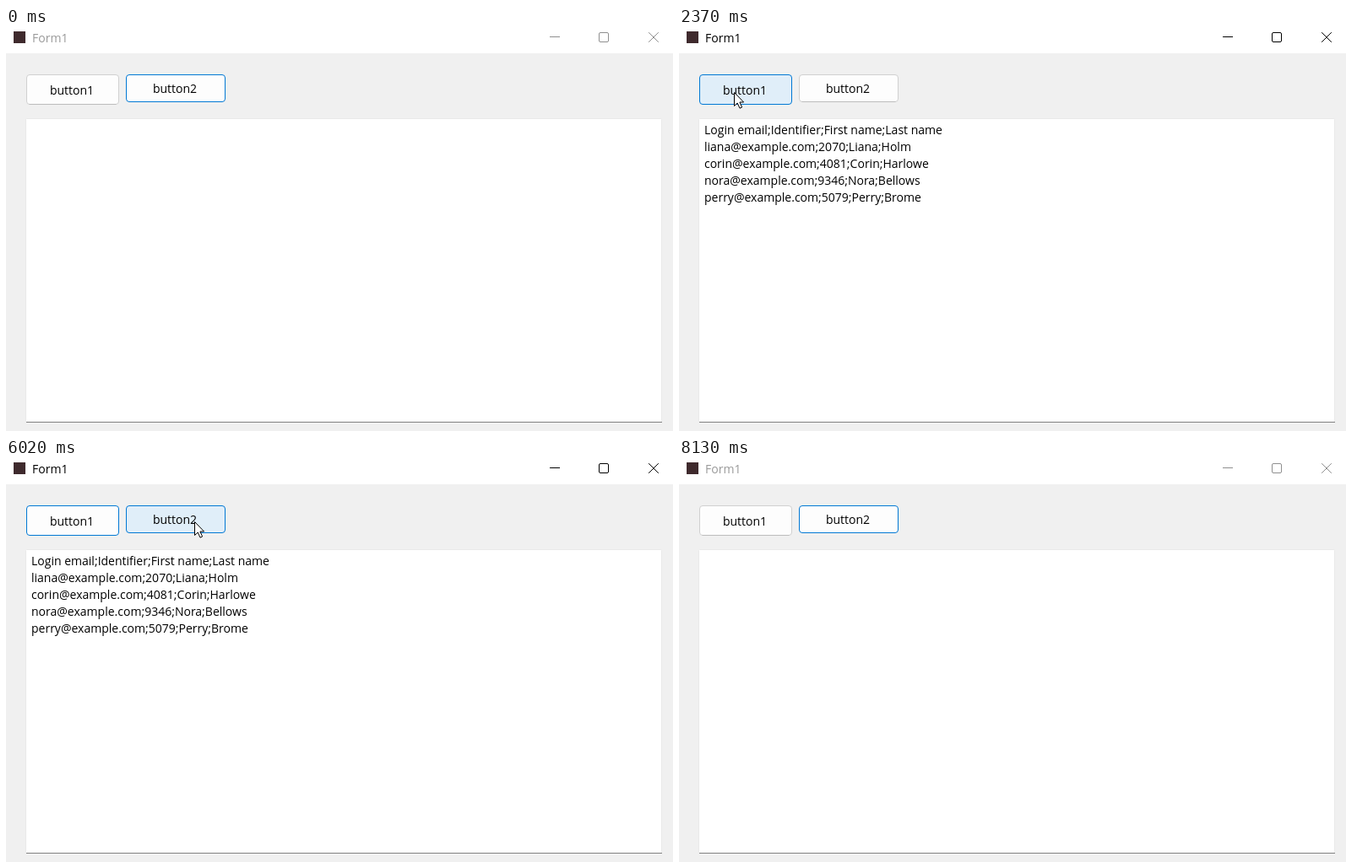
An HTML page for the animation above (8200 ms loop, 790 by 478 pixels).

```html
<!DOCTYPE html>
<html lang="en">
<head>
<meta charset="utf-8">
<title>Form1</title>
<style>
  html, body { margin: 0; width: 100%; height: 100%; overflow: hidden; background: #f0f0f0; }
  svg { display: block; width: 790px; height: 478px; }
  text { font: 14px "Open Sans", "Noto Sans", sans-serif; fill: #000; white-space: pre; }
  .btn text { text-anchor: middle; }
  .btn rect { fill: #fdfdfd; stroke: #d0d0d0; }
  .btn path { fill: none; stroke: #bcbcbc; }
  .btn.focus rect, .btn.hover rect { stroke: #0078d4; }
  .btn.focus path, .btn.hover path { stroke: none; }
  .btn.hover rect { fill: #e0eef9; }
  .btn.press rect { fill: #cce4f7; }
  .sys { fill: none; stroke: #000; }
  .idle .sys { stroke: #8f8f8f; }
  .idle text { fill: #999; }
</style>
</head>
<body>
<svg viewBox="0 0 790 478">
  <rect width="790" height="478" fill="#f0f0f0"/>
  <rect width="790" height="30" fill="#fff"/>
  <rect x="9" y="4" width="14" height="14" fill="#3f2a2d"/>
  <g id="bar">
    <text x="31" y="17">Form1</text>
    <path class="sys" d="M644 10.5H656"/>
    <rect class="sys" x="702.5" y="5.5" width="11" height="11" rx="1.5"/>
    <path class="sys" d="M761.2 5.2L772.8 16.8M772.8 5.2L761.2 16.8"/>
  </g>
  <g class="btn" id="one">
    <rect x="24.5" y="55.5" width="109" height="35" rx="3.5"/>
    <path d="M27.5 90.5H130.5"/>
    <text x="78" y="79">button1</text>
  </g>
  <g class="btn" id="two">
    <rect x="142.5" y="55.5" width="117" height="32" rx="3.5"/>
    <path d="M145.5 87.5H256.5"/>
    <text x="200" y="77">button2</text>
  </g>
  <rect x="23.5" y="107.5" width="753" height="360" rx="1" fill="#fff" stroke="#e9e9e9"/>
  <path d="M24 467.5H777" stroke="#808080"/>
  <g id="rows"></g>
  <path id="cursor" d="M.5 .5V16.5L4.2 13L7 19.2L9.6 18L6.9 12H11.6Z"
        fill="#fff" stroke="#000" stroke-linejoin="round"/>
</svg>
<script>
const LOOP = 8200;
const $ = id => document.getElementById(id);
const bar = $('bar'), rows = $('rows'), cursor = $('cursor');

const lines = [
  'Login email;Identifier;First name;Last name',
  'liana@example.com;2070;Liana;Holm',
  'corin@example.com;4081;Corin;Harlowe',
  'nora@example.com;9346;Nora;Bellows',
  'perry@example.com;5079;Perry;Brome'
];
lines.forEach((line, i) => {
  const el = document.createElementNS('http://www.w3.org/2000/svg', 'text');
  el.setAttribute('x', 30);
  el.setAttribute('y', 126 + 20 * i);
  el.textContent = line;
  rows.append(el);
});

const linear = p => p;
const easeOut = p => 1 - (1 - p) ** 1.6;
const easeIn = p => p * p;

const STEP = 67;
const SHOW = 130, HIDE = 7440;
const strokes = [
  { at: SHOW, end: 880, from: [546, 453], bend: [280, 450], to: [60, 89], ease: easeOut },
  { at: 960, end: 1100, from: [62, 86], bend: [64, 82], to: [65, 77], ease: linear },
  { at: 1380, end: 1380, from: [65, 76], bend: [65, 76], to: [65, 76], ease: linear },
  { at: 5290, end: 5690, from: [77, 77], bend: [118, 84], to: [174, 74], ease: linear },
  { at: 5770, end: 6020, from: [188, 74], bend: [212, 74], to: [223, 74], ease: linear },
  { at: 7040, end: 7370, from: [240, 77], bend: [460, 100], to: [704, 197], ease: easeIn }
];

const buttons = [
  { el: $('one'), x: 24, r: 134, b: 91, press: [2300, 2370], focus: t => within(t, 2300, 6440) },
  { el: $('two'), x: 142, r: 260, b: 88, press: [6440, 6500], focus: t => !within(t, 2300, 6440) }
];

function within(t, from, to) { return t >= from && t < to; }

function pointer(t) {
  if (!within(t, SHOW, HIDE)) return null;
  const { at, end, from, bend, to, ease } = strokes.findLast(s => s.at <= t);
  const steps = Math.round((end - at) / STEP);
  const p = t >= end ? 1 : Math.floor((t - at) / (end - at) * steps) / steps;
  const u = ease(p), v = 1 - u;
  return from.map((a, i) => Math.round(v * v * a + 2 * u * v * bend[i] + u * u * to[i]));
}

function draw(t) {
  const pos = pointer(t);
  cursor.style.display = pos ? '' : 'none';
  if (pos) cursor.setAttribute('transform', `translate(${pos})`);

  for (const b of buttons) {
    const over = pos && within(pos[0], b.x, b.r) && within(pos[1], 55, b.b);
    b.el.classList.toggle('hover', !!over);
    b.el.classList.toggle('press', within(t, ...b.press));
    b.el.classList.toggle('focus', b.focus(t));
  }
  bar.classList.toggle('idle', !within(t, 2300, 8130));
  rows.style.display = within(t, 2370, 6500) ? '' : 'none';
}

const start = performance.now();
function tick() {
  draw((performance.now() - start) % LOOP);
  requestAnimationFrame(tick);
}
tick();
</script>
</body>
</html>
```
